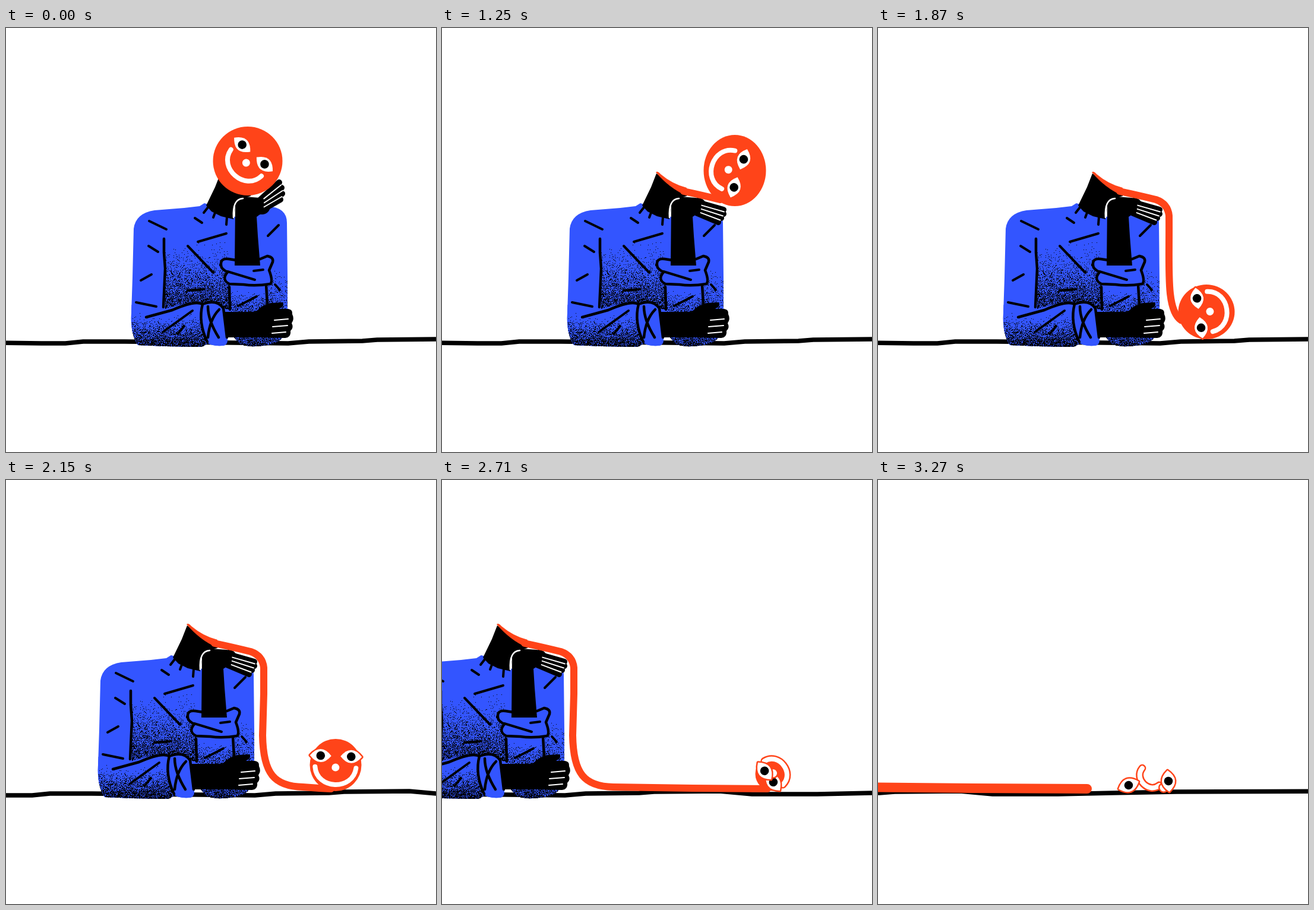
Write an HTML page with a canvas that moves like this. It is 724 by 714 pixels and loops after 4270 ms.

```html
<!DOCTYPE html>
<html lang="en">
<head>
<meta charset="utf-8">
<title>Melting head</title>
<style>
  html, body { margin: 0; width: 100%; height: 100%; overflow: hidden; background: #fff; }
  canvas { display: block; }
</style>
</head>
<body>
<canvas id="stage" width="724" height="714"></canvas>
<script>
const RED = '#ff4419', BLUE = '#3355ff', BLACK = '#000', WHITE = '#fff';
const LOOP = 4270;
const stage = document.getElementById('stage').getContext('2d');

const clamp01 = v => Math.max(0, Math.min(1, v));
const mix = (a, b, k) => a + (b - a) * k;
const progress = (t, from, to) => clamp01((t - from) / (to - from));

function fill(g, path, color) {
  g.fillStyle = color;
  g.fill(new Path2D(path));
}
function line(g, path, color, width) {
  g.strokeStyle = color;
  g.lineWidth = width;
  g.lineCap = g.lineJoin = 'round';
  g.stroke(new Path2D(path));
}
function oval(g, x, y, rx, ry, color) {
  g.fillStyle = color;
  g.beginPath();
  g.ellipse(x, y, rx, ry, 0, 0, 7);
  g.fill();
}
const dot = (g, x, y, r, color) => oval(g, x, y, r, r, color);

let seed = 7;
function random() {
  seed = (seed * 16807) % 2147483647;
  return seed / 2147483647;
}
// Ink grain whose density grows as a power of the depth
function grain(g, x0, x1, y0, y1, count, power) {
  g.fillStyle = BLACK;
  for (let i = 0; i < count; i++) {
    const y = mix(y0, y1, random() ** (1 / (power + 1)));
    g.fillRect(Math.floor(mix(x0, x1, random())), Math.floor(y), 1, 1);
  }
}

const GROUND = 'M-10 530L60 531L100 531L130 528L200 528L475 531L510 528L600 527L625 525L735 524' +
  'L790 529L900 529L992 527L1100 525L1400 524';
const TORSO = 'M222 534Q209 515 211 480L213 420L215 338Q218 312 250 307L300 303L326 300L334 295' +
  'L350 300L385 318L440 300Q473 302 473 328L474 420L474 500Q470 530 440 534Q405 540 391 530' +
  'L384 521L373 521Q374 535 364 535Q346 536 339 530Q334 538 322 537L270 536Z';
const NECK = 'M361 245L352 268L337 299L346 309L362 317L383 322L385 300L398 287L412 283L411 273L385 262Z';
const WRINKLES = 'M241 325L270 339M240 367L256 377M227 425L245 415M219 462L253 469M318 320L330 328' +
  'M340 302L333 311M352 311L349 319M372 318L371 331M323 360L371 346M306 367L349 412M441 350L459 332' +
  'M306 442L334 440M264 512L314 476M290 514L300 502M391 468L422 452M453 432L461 441';
const SEAMS = 'M266 355L266 378L268 405L265 470M236 487L280 475Q318 458 331 465M376 436L377 474M438 432L440 466';
const LOW_CUFF = 'M331 465Q323 495 339 529M331 465Q355 456 366 472L372 521' +
  'M340 469Q340 492 358 521M359 474Q343 490 340 521';
const HIGH_CUFF = 'M362 399Q361 387 375 389L388 391L428 389L440 384Q451 386 449 394L443 408' +
  'Q450 426 445 431Q420 435 400 432L376 431Q362 424 373 411Q362 406 362 399Z';
const LOW_HAND = 'M366 478L420 478Q434 465 446 463L466 462Q470 468 460 473L475 473Q483 474 482 482' +
  'Q486 490 481 497Q485 505 479 510Q480 521 470 522L420 521L372 521Z';
const FOREARM = 'M385 400L386 300Q386 284 402 284L428 286Q436 310 422 318L424 350L428 400Z';

function paintBody() {
  const canvas = document.createElement('canvas');
  canvas.width = 724;
  canvas.height = 714;
  const g = canvas.getContext('2d');
  fill(g, TORSO, BLUE);
  g.save();
  g.clip(new Path2D(TORSO));
  grain(g, 268, 377, 355, 475, 4900, 2.4);
  grain(g, 378, 438, 435, 480, 500, 2);
  grain(g, 440, 474, 400, 475, 350, 2);
  grain(g, 384, 474, 480, 537, 2300, 2.2);
  fill(g, 'M205 465L265 474Q318 456 340 466L374 474L374 540L205 540Z', BLUE);
  grain(g, 210, 336, 472, 537, 3900, 2.8);
  g.restore();
  fill(g, NECK, BLACK);
  line(g, WRINKLES, BLACK, 4);
  line(g, SEAMS, BLACK, 4.5);
  fill(g, 'M331 466Q355 458 367 474L372 530L345 532Q322 500 331 466Z', BLUE);
  line(g, LOW_CUFF, BLACK, 4.5);
  fill(g, HIGH_CUFF, BLUE);
  line(g, HIGH_CUFF, BLACK, 4.5);
  line(g, 'M373 410L419 424M417 409L433 407', BLACK, 4);
  fill(g, FOREARM, BLACK);
  line(g, 'M383 319Q381 288 399 287', WHITE, 2.5);
  fill(g, LOW_HAND, BLACK);
  line(g, 'M452 492L475 490M449 503L474 501M448 514L471 512', WHITE, 2);
  return canvas;
}
const body = paintBody();

// time, face x, face y, ball shift, ball radii, rotation, feature spread, camera pan
const KEYS = [
  [425, 407, 224, 0, 58.5, 58, 41, 1, 0],
  [950, 442, 226, 2, 57, 58, 70, 1, 0],
  [1250, 486, 240, 7, 52.5, 60, 109, 1, 0],
  [1380, 486, 240, 7, 52.5, 60, 109, 1, 0],
  [1450, 500, 248, 5, 52, 58, 116, 1, 0],
  [1520, 522, 275, 2, 50, 56, 132, 1, 0],
  [1590, 536, 325, 0, 49, 54, 156, 1, 0],
  [1730, 546, 430, -1, 48, 51, 212, 1, 0],
  [1870, 555, 478, -2, 47.5, 46, 262, 1, 0],
  [2150, 555, 480, 0, 43.5, 44, 362, 1.03, 56],
  [2430, 561, 485, -14, 34, 37, 468, .82, 155],
  [2710, 556, 495, 0, 28.5, 28.5, 592, .48, 268],
  [3060, 553, 511, 0, 11, 11, 770, .45, 492],
  [3270, 450, 520, 0, 0, 0, 770, .45, 597]
];

function poseAt(t) {
  if (t <= KEYS[0][0]) return KEYS[0];
  const next = KEYS.findIndex(key => key[0] >= t);
  if (next < 0) return KEYS[KEYS.length - 1];
  const a = KEYS[next - 1], b = KEYS[next];
  return a.map((v, i) => mix(v, b[i], progress(t, a[0], b[0])));
}

// The drawing is held between these steps
function heldTime(t) {
  const snap = (start, step, end) => Math.min(end, start + Math.floor((t - start) / step) * step);
  if (t < 500) return 0;
  if (t < 1050) return snap(500, 75, 950);
  if (t < 1450) return snap(1050, 100, 1250);
  return snap(1450, 70, 3270);
}

function drawFingers(t) {
  const open = progress(t, 425, 1250);
  const raised = [[460, 260], [464, 269], [465, 279], [462, 289]];
  const flat = [[474, 306], [474, 313], [470, 320], [465, 327]];
  const fingers = raised.map(([x, y], i) =>
    [425, 292 + i * 6, mix(x, flat[i][0], open), mix(y, flat[i][1], open)]);
  dot(stage, 431, 300, 14, BLACK);
  for (const [x, y, tx, ty] of fingers) line(stage, `M${x} ${y}L${tx} ${ty}`, BLACK, 10);
  for (let i = 0; i < 3; i++) {
    const [x, y, tx, ty] = fingers[i].map((v, j) => (v + fingers[i + 1][j]) / 2);
    line(stage, `M${mix(x, tx, .25)} ${mix(y, ty, .25)}L${tx + 1} ${ty}`, WHITE, 2);
  }
}

function drawRope(t, x, y, r, pan) {
  stage.save();
  if (t < 1450) {
    stage.beginPath();
    stage.rect(0, 0, x, 714);
    stage.clip();
  }
  fill(stage, 'M360 243Q363 240 368 246Q388 263 412 269L411 282Q383 270 360 243Z', RED);
  let path = 'M407 275Q440 282 468 289';
  if (t >= 1450) {
    path += 'Q488 296 490 316';
    if (t <= 1870) {
      const endY = y + r * .3;
      path += `C491 ${mix(316, endY, .5)} 484 ${mix(316, endY, .9)} ${x - r + 5} ${endY}`;
    } else {
      const end = x - 90 * progress(t, 3060, 3270) + pan;
      path += `L490 360L488 430C489 495 508 516 556 517L${mix(556, end, .5)} 519L${end - 8} 520`;
    }
  }
  line(stage, path, RED, mix(12, 16, progress(t, 2850, 3270)));
  stage.restore();
}

function drawEye() {
  const lens = 'M-18 0Q0 -22 18 0Q0 22 -18 0Z';
  line(stage, lens, RED, 5);
  fill(stage, lens, WHITE);
  dot(stage, 0, 0, 7.3, BLACK);
}
function drawNose() {
  dot(stage, 0, 0, 9, RED);
  dot(stage, 0, 0, 6.5, WHITE);
}
function drawMouth(size) {
  const n = v => v * size;
  const smile = `M${n(-34)} ${n(4)}C${n(-30)} ${n(42)} ${n(30)} ${n(42)} ${n(34)} ${n(4)}`;
  line(stage, smile, RED, 13);
  line(stage, smile, WHITE, 8);
}

// Place on the face, then place and angle in the final heap
const FEATURES = [
  { draw: drawMouth, face: [0, 0], heap: [11, -22, 765] },
  { draw: drawEye, face: [-25, -14.6], heap: [-28, -6, 700] },
  { draw: drawNose, face: [0, 4], heap: [31, -2, 765] },
  { draw: drawEye, face: [25, -14.6], heap: [39, -13, 805] }
];

function drawFace(t, x, y, turn, spread) {
  const melt = progress(t, 2850, 3270);
  const a = turn * Math.PI / 180, c = Math.cos(a) * spread, s = Math.sin(a) * spread;
  for (const { draw, face: [fx, fy], heap: [hx, hy, angle] } of FEATURES) {
    stage.save();
    stage.translate(x + mix(fx * c - fy * s, hx, melt), y + mix(fx * s + fy * c, hy, melt));
    stage.rotate(mix(turn, angle, melt) * Math.PI / 180);
    draw(mix((1 + spread) / 2, .6, melt));
    stage.restore();
  }
}

function frame(now) {
  const t = heldTime(now % LOOP);
  const [, x, y, shift, rx, ry, turn, spread, pan] = poseAt(t);
  stage.fillStyle = WHITE;
  stage.fillRect(0, 0, 724, 714);
  stage.save();
  stage.translate(-pan, 0);
  line(stage, GROUND, BLACK, 7.5);
  stage.drawImage(body, 0, 0);
  drawFingers(t);
  drawRope(t, x + shift, y, rx, pan);
  oval(stage, x + shift + pan, y, rx, ry, RED);
  drawFace(t, x + pan, y, turn, spread);
  stage.restore();
}

const start = performance.now();
function tick() {
  frame(performance.now() - start);
  requestAnimationFrame(tick);
}
tick();
</script>
</body>
</html>
```
